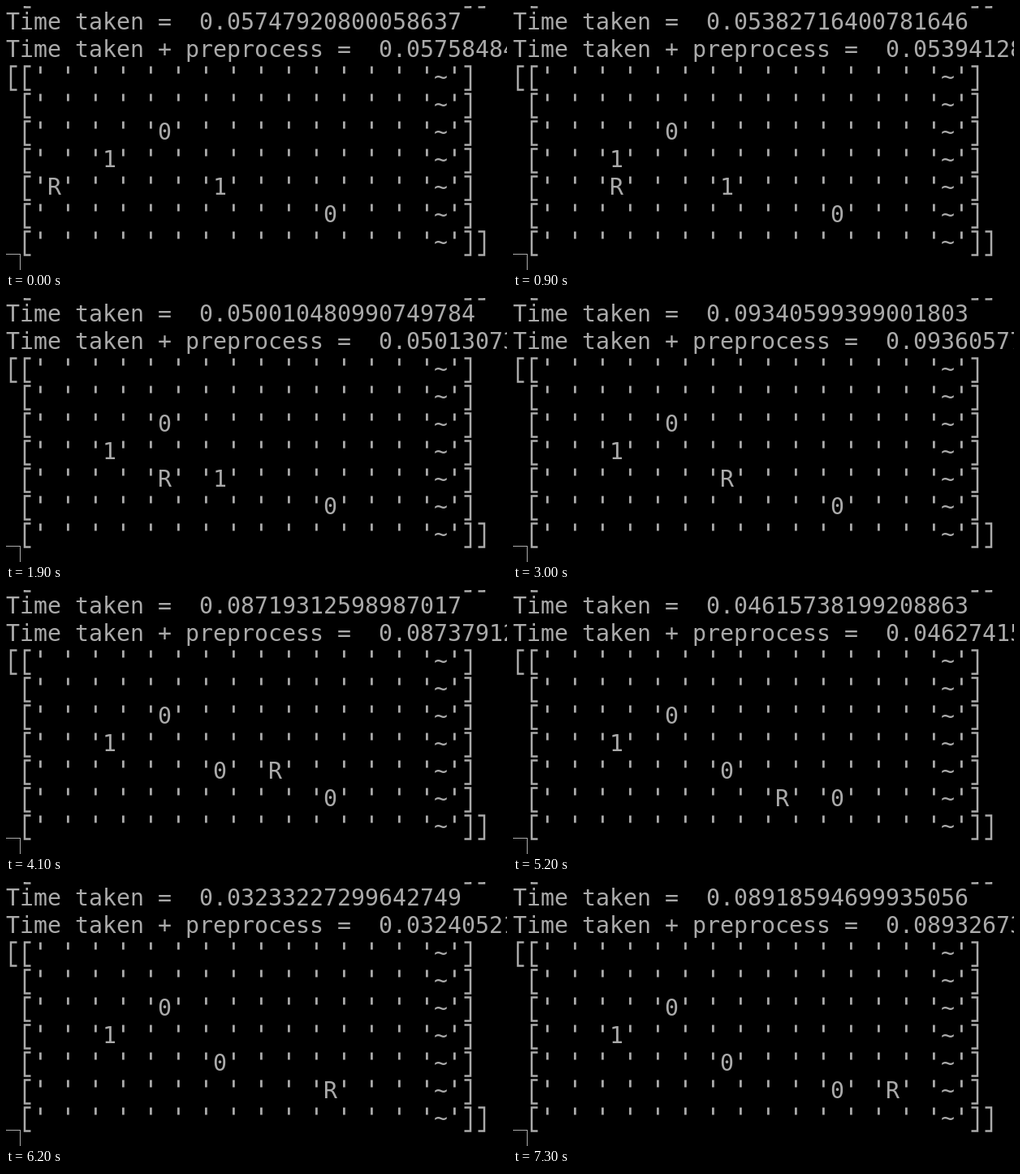
Recreate the animation shown at these times as an HTML page with a canvas. Size 617 by 326 pixels, loop 8000 ms.

```html
<!DOCTYPE html>
<html lang="en">
<head>
<meta charset="utf-8">
<title>Grid robot</title>
<style>
html, body { margin: 0; width: 100%; height: 100%; overflow: hidden; background: #000; }
canvas { display: block; }
</style>
</head>
<body>
<canvas id="stage" width="617" height="326"></canvas>
<script>
const ctx = document.getElementById('stage').getContext('2d');
const CELL = 17, LINE = 34, BASE = 29, LOOP = 8000;

// start time, robot row, robot column, time taken, time with preprocess
const steps = [
  [0, 4, 0, '0.05747920800058637', '0.05758484'],
  [900, 4, 1, '0.05382716400781646', '0.05394128'],
  [1900, 4, 2, '0.050010480990749784', '0.05013073'],
  [3000, 4, 3, '0.09340599399001803', '0.09360577'],
  [4100, 4, 4, '0.08719312598987017', '0.08737912'],
  [5200, 5, 4, '0.04615738199208863', '0.04627415'],
  [6200, 5, 5, '0.03233227299642749', '0.03240521'],
  [7300, 5, 6, '0.08918594699935056', '0.08932673']
];

function bracket(x, y, dir) {
  const mid = x + 8.5;
  ctx.beginPath();
  ctx.moveTo(mid + dir * 5, y - 22.5);
  ctx.lineTo(mid - dir * 2.5, y - 22.5);
  ctx.lineTo(mid - dir * 2.5, y + 6.5);
  ctx.lineTo(mid + dir * 5, y + 6.5);
  ctx.stroke();
}

function drawLine(text, line) {
  const y = BASE + line * LINE;
  [...text].forEach((ch, col) => {
    const x = col * CELL;
    if (ch === '[') bracket(x, y, 1);
    else if (ch === ']') bracket(x, y, -1);
    else if (ch === "'") ctx.fillRect(x + 7, y - 22.5, 2.8, 9);
    else ctx.fillText(ch, x, y);
  });
}

function gridLine(row, robotRow, robotCol, cleaned) {
  const cells = [...'       ~'];
  if (row === 2) cells[2] = '0';
  if (row === 3) cells[1] = '1';
  if (row === 4) cells[3] = cleaned ? '0' : '1';
  if (row === 5) cells[5] = '0';
  if (row === robotRow) cells[robotCol] = 'R';
  const body = cells.map(c => `'${c}'`).join(' ');
  return (row ? ' [' : '[[') + body + (row === 6 ? ']]' : ']');
}

function draw(now) {
  const t = now % LOOP;
  const [start, row, col, taken, total] = steps.findLast(s => t >= s[0]) || steps[0];
  ctx.fillStyle = '#000';
  ctx.fillRect(0, 0, 617, 326);
  ctx.fillStyle = ctx.strokeStyle = '#aaa';
  ctx.font = '28.24px "DejaVu Sans Mono", monospace';
  ctx.lineWidth = 2.5;

  drawLine(gridLine(6), -1);
  drawLine('Time taken =  ' + taken, 0);
  drawLine('Time taken + preprocess =  ' + total, 1);
  for (let r = 0; r < 7; r++) drawLine(gridLine(r, row, col, start >= 4100), r + 2);

  // hollow cursor
  ctx.lineWidth = 1;
  ctx.strokeRect(-0.5, 306.5, 18, 34);
  requestAnimationFrame(draw);
}
requestAnimationFrame(draw);
</script>
</body>
</html>
```
